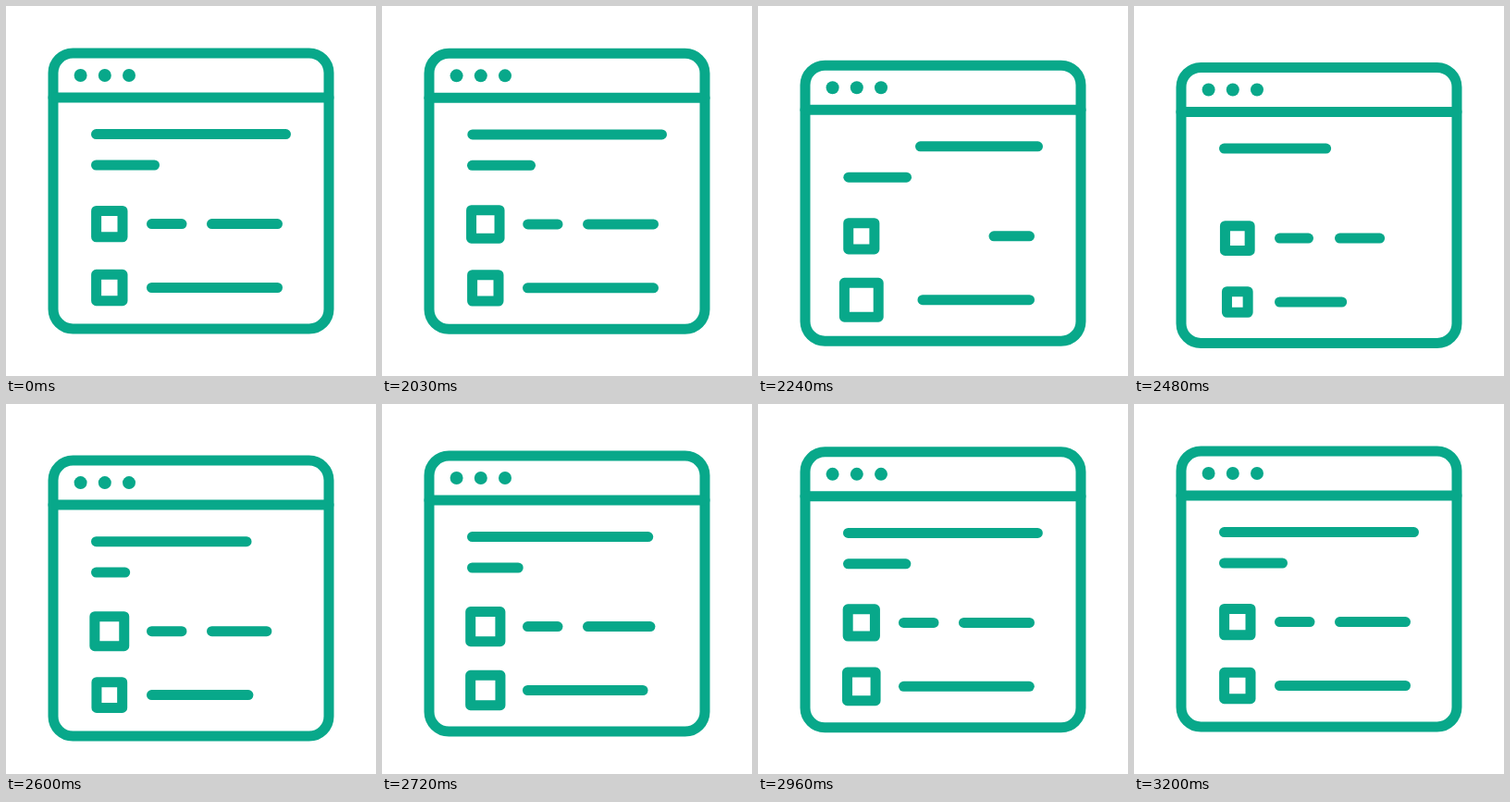
Recreate the animation shown at these times as an HTML page. Size 400 by 400 pixels, loop 3230 ms.

```html
<!DOCTYPE html>
<html lang="en">
<head>
<meta charset="utf-8">
<title>Window icon</title>
<style>
  html, body { margin: 0; width: 100%; height: 100%; overflow: hidden; background: #fff; }
  svg { display: block; width: 100vw; height: 100vh; }
  #win { fill: none; stroke: #08a88a; stroke-width: 11; stroke-linecap: round; stroke-linejoin: round; }
  .dot { fill: #08a88a; stroke: none; }
</style>
</head>
<body>
<svg viewBox="0 0 400 400">
  <g id="win">
    <rect x="51" y="51" width="298" height="298" rx="21.3"/>
    <path d="M51 99H349"/>
    <circle class="dot" cx="80.6" cy="75" r="7"/>
    <circle class="dot" cx="106.8" cy="75" r="7"/>
    <circle class="dot" cx="133" cy="75" r="7"/>
  </g>
</svg>
<script>
const LOOP = 3230, START = 2030, STEP = 30;
const win = document.getElementById('win');

// Each bar leaves to the right during `out`, then grows from the left during `back`.
const bars = [
  { x1: 97.5,  x2: 302.5, y: 138.6, out: [1990, 2335], back: [2335, 3050] },
  { x1: 97.5,  x2: 160.5, y: 172,   out: [2190, 2470], back: [2482, 3130] },
  { x1: 157.5, x2: 190,   y: 235.6, out: [1990, 2200], back: [2245, 2640] },
  { x1: 222.5, x2: 293.5, y: 235.6, out: [1998, 2312], back: [2312, 3010] },
  { x1: 157.5, x2: 293.5, y: 304.5, out: [2115, 2350], back: [2350, 3066] }
];

const boxes = [{ y: 235.6, delay: 0 }, { y: 304.5, delay: 100 }];
const sizes = [[2000, 28.4], [2100, 38], [2340, 22.2], [2645, 32.5], [3090, 28.4]];

const add = tag => win.appendChild(document.createElementNS('http://www.w3.org/2000/svg', tag));
const set = (el, attrs) => { for (const k in attrs) el.setAttribute(k, attrs[k]); };
bars.forEach(b => b.el = add('line'));
boxes.forEach(b => b.el = add('rect'));

const part = (t, [a, b]) => Math.min(1, Math.max(0, (t - a) / (b - a)));
const smooth = p => p * p * (3 - 2 * p);

// Ease with control points (x1, 0) and (x2, 1).
function bezier(p, x1, x2) {
  let lo = 0, hi = 1;
  for (let i = 0; i < 24; i++) {
    const s = (lo + hi) / 2, r = 1 - s;
    if (3 * s * r * r * x1 + 3 * s * s * r * x2 + s * s * s < p) lo = s; else hi = s;
  }
  return smooth(lo);
}

function sizeAt(t) {
  let v = sizes[0][1];
  for (let i = 1; i < sizes.length; i++) {
    const [a, from] = sizes[i - 1], [b, to] = sizes[i];
    if (t >= a) v = from + (to - from) * smooth(part(t, [a, b]));
  }
  return v;
}

function draw(t) {
  const drop = 17 * (smooth(part(t, [2000, 2345])) - bezier(part(t, [2345, 3200]), .37, .19));
  set(win, { transform: `translate(0 ${drop.toFixed(3)})` });

  for (const b of bars) {
    const len = b.x2 - b.x1, gone = part(t, b.out) ** 3;
    const grown = 1 - (1 - part(t, b.back)) ** 3.4;
    const leaving = gone < 1;
    set(b.el, {
      x1: leaving ? b.x1 + len * gone : b.x1,
      x2: leaving ? b.x2 : b.x1 + len * grown,
      y1: b.y, y2: b.y,
      visibility: leaving || grown > 0 ? 'visible' : 'hidden'
    });
  }

  for (const b of boxes) {
    const s = sizeAt(t - b.delay);
    set(b.el, { x: 111.8 - s / 2, y: b.y - s / 2, width: s, height: s });
  }
}

const begin = performance.now();
function tick() {
  const t = (performance.now() - begin) % LOOP;
  draw(t < START ? 0 : START + Math.floor((t - START) / STEP) * STEP);
  requestAnimationFrame(tick);
}
tick();
</script>
</body>
</html>
```
